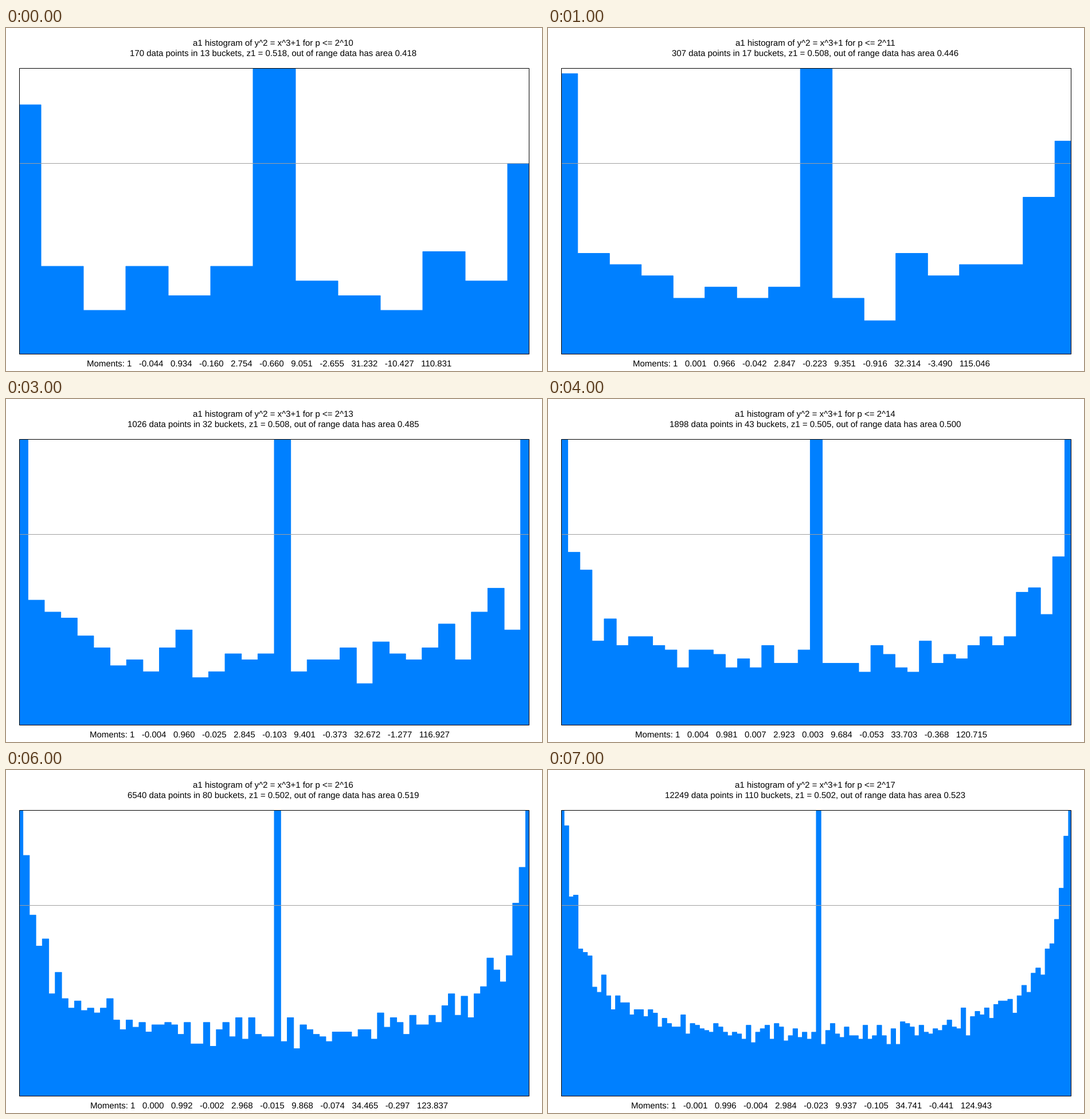
Recreate the animation shown at these times as a matplotlib script. Size 935x599 px, loop 8000 ms.

```python
"""Histograms of the normalised trace a1 of y^2 = x^3 + 1 for growing prime bounds."""
import matplotlib.pyplot as plt
import numpy as np
from matplotlib.animation import FuncAnimation
from matplotlib.patches import Rectangle, StepPatch

W, H, DPI = 935, 599, 100
LEFT, RIGHT, TOP, BASE = 24, 912, 70, 570
FIRST, LAST = 10, 17
PX = 72 / DPI
BLUE, GRAY = "#0080ff", "#a0a0a0"

plt.rcParams["text.hinting"] = "none"


def sieve(limit):
    prime = np.ones(limit + 1, bool)
    prime[:2] = False
    for k in range(2, int(limit ** 0.5) + 1):
        if prime[k]:
            prime[k * k::k] = False
    return prime


def traces(limit):
    """Primes p > 3 and their a1 values; p = a^2 + 3b^2 gives trace 2a, a = 1 mod 3."""
    prime = sieve(limit)
    root = int(limit ** 0.5) + 1
    a, b = np.meshgrid(np.arange(1, root), np.arange(1, root))
    p = a * a + 3 * b * b
    ok = p <= limit
    a, p = a[ok], p[ok]
    split = prime[p]
    a, p = a[split], p[split]
    a1 = np.where(a % 3 == 1, -2.0, 2.0) * a / np.sqrt(p)

    inert = np.flatnonzero(prime)
    inert = inert[(inert > 3) & (inert % 3 == 2)]
    return np.r_[p, inert], np.r_[a1, np.zeros(len(inert))]


PRIMES, VALUES = traces(2 ** LAST)


def outline(counts):
    """Bar tops and edges; the first and last bar are centred on the plot's sides."""
    n = len(counts)
    centres = np.clip((np.arange(n + 1) - 0.5) / (n - 1), 0, 1)
    tops = BASE - counts * (BASE - TOP) / (1.5 * n)
    return np.maximum(tops, TOP), LEFT + (RIGHT - LEFT) * centres


fig = plt.figure(figsize=(W / 100, H / 100), dpi=DPI, facecolor="white")
ax = fig.add_axes([0, 0, 1, 1])
ax.set_xlim(0, W)
ax.set_ylim(H, 0)
ax.axis("off")

frame = Rectangle((LEFT - 0.5, TOP + 0.5), RIGHT - LEFT + 1, BASE - TOP - 1,
                  fill=False, ec="black", lw=PX, snap=False, zorder=4)
ax.add_patch(frame)

bars = StepPatch([BASE], [LEFT, RIGHT], baseline=BASE, fill=True, fc=BLUE,
                 ec=BLUE, lw=PX, snap=False, zorder=1)
ax.add_patch(bars)
bars.set_clip_path(frame)

level = int(BASE - (BASE - TOP) * 2 / 3) + 0.5
ax.plot([LEFT, RIGHT], [level, level], color=GRAY, lw=PX, snap=False,
        solid_capstyle="butt", zorder=3, scalex=False, scaley=False)


def label(x, y):
    return ax.text(x, y, "", ha="center", va="baseline", color="black",
                   family="Liberation Sans", size=15 * PX)


title = label(466, 31)
summary = label(466, 49)
footer = label(459.5, 591)


def draw(i):
    n = FIRST + i
    a1 = VALUES[PRIMES <= 2 ** n]
    total = len(a1)
    buckets = int(total ** 0.5)
    index = np.floor((a1 + 2) / 4 * buckets).astype(int)
    counts = np.bincount(np.clip(index, 0, buckets - 1), minlength=buckets)

    cap = int(1.5 * buckets + 0.5)
    outside = np.maximum(counts - cap, 0).sum() / total
    zeros = np.mean(a1 == 0)
    moments = [f"{np.mean(a1 ** k):.3f}" for k in range(1, 11)]

    tops, edges = outline(counts)
    bars.set_data(values=tops, edges=edges)
    title.set_text(f"a1 histogram of y^2 = x^3+1 for p <= 2^{n}")
    summary.set_text(f"{total} data points in {buckets} buckets, z1 = {zeros:.3f}, "
                     f"out of range data has area {outside:.3f}")
    footer.set_text("Moments: " + "   ".join(["1"] + moments))
    return bars, title, summary, footer


anim = FuncAnimation(fig, draw, frames=LAST - FIRST + 1, interval=1000,
                     repeat=True, repeat_delay=0, blit=False)
plt.show()
```
